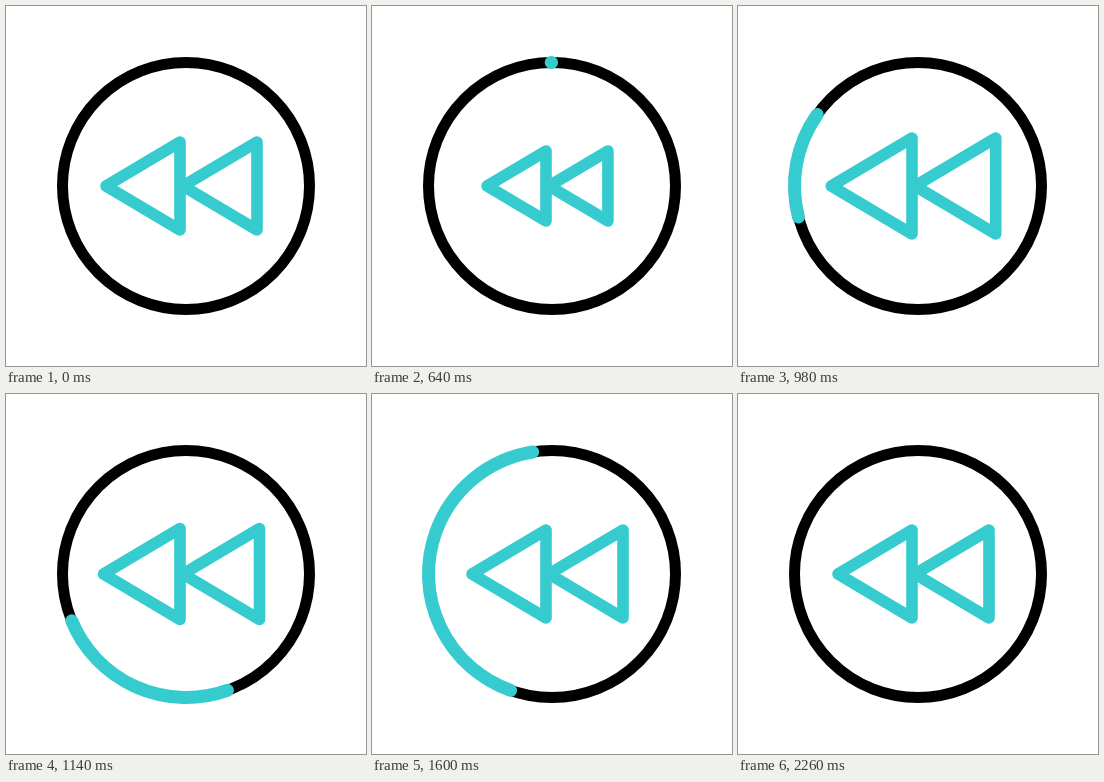
Recreate the animation shown at these times as an HTML page with a canvas. Size 360 px wide and 360 px high, loop 2720 ms.

```html
<!DOCTYPE html>
<html lang="en">
<head>
<meta charset="utf-8">
<title>Rewind</title>
<style>
  html, body { margin: 0; width: 100%; height: 100%; overflow: hidden; background: #fff; }
  canvas { display: block; }
</style>
</head>
<body>
<canvas id="stage" width="360" height="360"></canvas>
<script>
const ctx = document.getElementById("stage").getContext("2d");
const LOOP = 2720;
const STEP = 20;
const TEAL = "#36cccf";
const CENTER = 180;
const RADIUS = 123.5;
const SWEEP_START = 620;
const HEAD_END = 2120;
const TAIL_END = 2260;

// [time, scale] of the arrows: anticipation, squeeze, overshoot, settle
const SCALE_KEYS = [[0, 1], [240, 1.035], [610, 0.79], [960, 1.092], [1300, 0.985], [1560, 1]];

const clamp = v => Math.min(1, Math.max(0, v));
const progress = (t, from, to) => clamp((t - from) / (to - from));
const smooth = p => p * p * (3 - 2 * p);

// Cubic bezier easing with handles (x1, 0) and (x2, 1), solved by bisection
function ease(p, x1, x2) {
  let low = 0, high = 1;
  for (let i = 0; i < 24; i++) {
    const s = (low + high) / 2, r = 1 - s;
    const x = 3 * x1 * s * r * r + 3 * x2 * s * s * r + s * s * s;
    if (x < p) low = s; else high = s;
  }
  return smooth((low + high) / 2);
}

function arrowScale(t) {
  const next = SCALE_KEYS.findIndex(key => key[0] > t);
  if (next < 0) return 1;
  const [t0, a] = SCALE_KEYS[next - 1];
  const [t1, b] = SCALE_KEYS[next];
  return a + (b - a) * smooth(progress(t, t0, t1));
}

function strokeArc(color, width, from, to) {
  ctx.strokeStyle = color;
  ctx.lineWidth = width;
  ctx.beginPath();
  ctx.arc(CENTER, CENTER, RADIUS, from, to);
  ctx.stroke();
}

function strokeTriangle(apexX, baseX, halfHeight) {
  ctx.strokeStyle = TEAL;
  ctx.lineWidth = 11.6;
  ctx.beginPath();
  ctx.moveTo(apexX, CENTER);
  ctx.lineTo(baseX, CENTER - halfHeight);
  ctx.lineTo(baseX, CENTER + halfHeight);
  ctx.closePath();
  ctx.stroke();
}

function drawSweep(t) {
  if (t < SWEEP_START || t >= TAIL_END) return;
  const turns = Math.PI * 4;
  const top = -Math.PI / 2;
  const head = turns * smooth(progress(t, SWEEP_START, HEAD_END));
  const tail = turns * ease(progress(t, SWEEP_START, TAIL_END), 0.454, 0.784);
  // A tiny minimum length keeps the round caps visible as a dot
  strokeArc(TEAL, 13, top - Math.max(head, tail + 0.002), top - tail);
}

function draw(t) {
  ctx.fillStyle = "#fff";
  ctx.fillRect(0, 0, 360, 360);
  ctx.lineCap = ctx.lineJoin = "round";

  strokeArc("#000", 11, 0, Math.PI * 2);
  drawSweep(t);

  const scale = arrowScale(t);
  const width = 74 * scale, halfHeight = 44 * scale;
  strokeTriangle(174 - width, 174, halfHeight);
  strokeTriangle(177, 177 + width, halfHeight);
}

const start = performance.now();
function tick() {
  const t = (performance.now() - start) % LOOP;
  draw(Math.floor(t / STEP) * STEP);
  requestAnimationFrame(tick);
}
tick();
</script>
</body>
</html>
```
